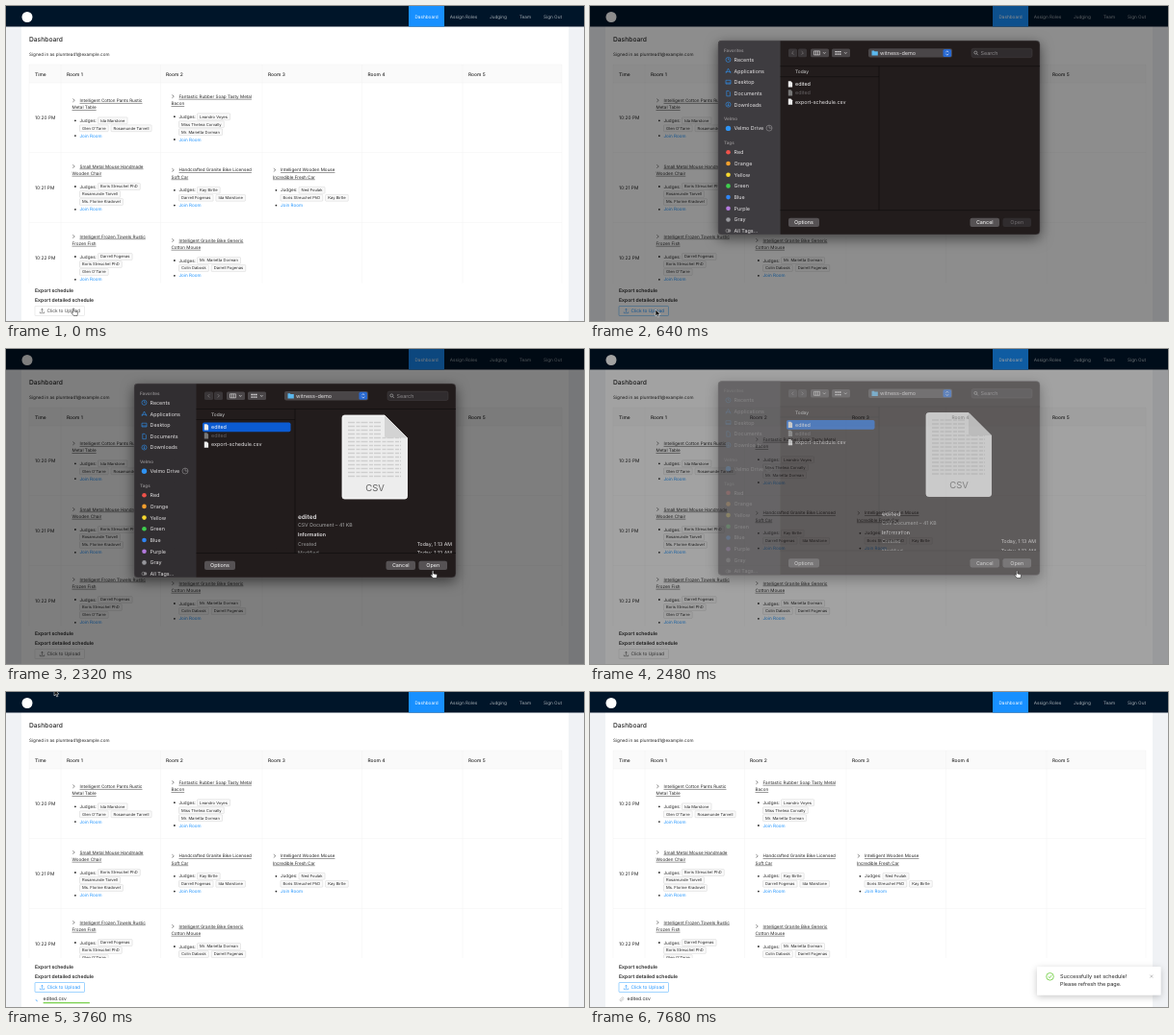
An HTML page that plays this animation: 600x328 px, repeating every 8 s.

```html
<!DOCTYPE html>
<html>
<head>
<meta charset="utf-8">
<style>
  html, body { margin: 0; width: 100%; height: 100%; overflow: hidden; background: #f0f2f5; }
  svg { display: block; font-family: Inter, Roboto, sans-serif; text-rendering: geometricPrecision; --btn: #444; --edge: #d9d9d9; }
  .btn { fill: #fff; stroke: var(--edge); stroke-width: .5; }
  .ink { stroke: var(--btn); fill: none; stroke-width: .5; }
</style>
</head>
<body>
<svg id="stage" width="600" height="328" viewBox="0 0 600 328"></svg>
<script>
const stage = document.getElementById('stage');
const $ = id => document.getElementById(id);
const INK = '#262626', LINK = '#1890ff', BODY = 4.6;

// y is the vertical middle of the text
const text = (x, y, s, size = BODY, fill = INK, attrs = '') =>
  `<text x="${x}" y="${y + size * .36}" font-size="${size}" fill="${fill}" ${attrs}>${s}</text>`;
const rect = (x, y, w, h, fill, attrs = '') =>
  `<rect x="${x}" y="${y}" width="${w}" height="${h}" fill="${fill}" ${attrs}/>`;
const dot = (x, y, r, fill, attrs = '') => `<circle cx="${x}" cy="${y}" r="${r}" fill="${fill}" ${attrs}/>`;
const path = (d, attrs) => `<path d="${d}" ${attrs}/>`;
const line = (d, color, width = .5, attrs = '') => path(d, `fill="none" stroke="${color}" stroke-width="${width}" ${attrs}`);
const BOLD = 'font-weight="600"', MEDIUM = 'font-weight="500"', MIDDLE = 'text-anchor="middle"';

const ruler = document.createElement('canvas').getContext('2d');
ruler.font = '100px Inter, Roboto, sans-serif';
const widthOf = (s, size) => ruler.measureText(s).width * size / 100;

function tagRow(x, y, names) {
  return names.map(name => {
    const w = widthOf(name, 4.1) + 5.2;
    const tag = rect(x, y - 3.4, w, 6.8, '#fafafa', 'rx=".7" stroke="#cfcfcf" stroke-width=".45"') +
      text(x + 2.6, y, name, 4.1);
    x += w + 2.8;
    return tag;
  }).join('');
}

function cell(x, y, title, rows) {
  const under = 'text-decoration="underline"';
  const joinY = y + 20.8 + rows.length * 8;
  return line(`M${x + .8} ${y - 1.7}l2 1.7l-2 1.7`, INK) +
    text(x + 8, y, title[0], BODY, INK, under) + text(x, y + 7.2, title[1], BODY, INK, under) +
    dot(x + 3.4, y + 21, .9, INK) + text(x + 8, y + 21, 'Judges:') +
    rows.map((names, i) => tagRow(x + (i ? 8 : 27), y + 21 + i * 8, names)).join('') +
    dot(x + 3.4, joinY, .9, INK) + text(x + 8, joinY, 'Join Room', BODY, LINK);
}

const KIM = 'Ida Marstone', OWEN = "Glen O'Tarre", JACQ = 'Rosamunde Tarvell', SAM = 'Mr. Marietta Dorman',
  CHRIS = 'Boris Streuchel PhD', JAY = 'Kay Birtle', CARROLL = 'Darrell Fogenas';

const columns = [57, 160.5, 266, 369.5, 474];
const table =
  rect(24, 61, 553, 19, '#fafafa') +
  line('M24 61H577M24 80H577M24 152.5H577M24 225.5H577M24 61V300M577 61V300' +
    columns.map(x => `M${x} 61V300`).join(''), '#f2f2f2') +
  text(30, 71, 'Time', 4.9, INK, MEDIUM) +
  [63, 166, 272, 375.5, 480].map((x, i) => text(x, 71, `Room ${i + 1}`, 4.9, INK, MEDIUM)).join('') +
  [116, 188.8, 261.8].map((y, i) => text(30, y, `10:2${i} PM`, 4.9)).join('') +
  cell(68.5, 98.3, ['Intelligent Cotton Pants Rustic', 'Metal Table'], [[KIM], [OWEN, JACQ]]) +
  cell(171.5, 94.2, ['Fantastic Rubber Soap Tasty Metal', 'Bacon'], [['Leandro Voyes'], ['Miss Thelma Corvally'], [SAM]]) +
  cell(68.5, 167, ['Small Metal Mouse Handmade', 'Wooden Chair'], [[CHRIS], [JACQ], ['Ms. Florine Kradovel']]) +
  cell(171.5, 170.8, ['Handcrafted Granite Bike Licensed', 'Soft Car'], [[JAY], [CARROLL, KIM]]) +
  cell(277, 170.8, ['Intelligent Wooden Mouse', 'Incredible Fresh Car'], [['Ned Foulak'], [CHRIS, JAY]]) +
  cell(68.5, 240, ['Intelligent Frozen Towels Rustic', 'Frozen Fish'], [[CARROLL], [CHRIS], [OWEN]]) +
  cell(171.5, 244, ['Intelligent Granite Bike Generic', 'Cotton Mouse'], [[SAM], ['Colin Dabosk', CARROLL]]);

const menu = [[475, 'Assign Roles'], [511, 'Judging'], [539, 'Team'], [567.5, 'Sign Out']];
const page =
  rect(0, 0, 600, 328, '#f0f2f5') + rect(16, 21, 568, 307, '#fff') + rect(0, 0, 600, 21.5, '#001529') +
  dot(22, 11.5, 5.5, '#fff') + rect(418, 0, 37, 21.5, LINK) +
  text(436.5, 11, 'Dashboard', 4.7, '#fff', MIDDLE) +
  menu.map(([x, s]) => text(x, 11, s, 4.7, '#a6adb4', MIDDLE)).join('') +
  text(24, 34.7, 'Dashboard', 6.7, INK, MEDIUM) + text(24, 50, 'Signed in as plumtea41@example.com') +
  `<clipPath id="view"><rect id="viewRect" x="16" y="55" width="568"/></clipPath><g clip-path="url(#view)">${table}</g>` +
  `<g id="foot">${text(30, 296.5, 'Export schedule', 5.1, INK, BOLD)}
    ${text(30, 306, 'Export detailed schedule', 5.1, INK, BOLD)}
    <rect class="btn" x="30" y="312.5" width="51.5" height="10" rx=".7"/>
    <path class="ink" d="M37.5 319V315.2M36.2 316.5L37.5 315.2L38.8 316.5M35.3 318.3V319.8H39.7V318.3"/>
    ${text(42.5, 317.5, 'Click to Upload', 4.8, 'var(--btn)')}</g>` +
  `<g id="upload">${text(38.5, 319.7, 'edited.csv', 4.95)}
    <g id="spin">${line('M-2 0A2 2 0 0 0 0 2', LINK)}</g>
    <g id="clip">${line('M32 321.3l2.4-2.4a.7 .7 0 0 0-1-1l-2 2a1.2 1.2 0 0 0 1.7 1.7l2-2', '#888', .4)}</g>
    <rect id="bar" x="38.5" y="323.3" height="1" rx=".5"/></g>` +
  `<g id="notice">${rect(464, 286, 128.5, 29.5, '#fff', 'rx="1" filter="url(#soft)"')}
    ${dot(477.5, 296.3, 3.8, 'none', 'stroke="#52c41a" stroke-width=".7"')}
    ${line('M475.8 296.3l1.3 1.4l2.3-2.9', '#52c41a', .7)}
    ${text(488, 296.3, 'Successfully set schedule!', 5.5)}${text(488, 304.5, 'Please refresh the page.', 5.5)}
    ${line('M581.3 294.6l3 3m0-3l-3 3', '#888')}</g>`;

const PALE = '#e6e4e5', GREY = '#8f8c8e';
const places = [[53.3, 'Recents'], [65.1, 'Applications'], [76.7, 'Desktop'], [88.4, 'Documents'], [100, 'Downloads'], [124.8, 'Velmo Drive']];
const tags = [['Red', '#f0524a'], ['Orange', '#f5a02d'], ['Yellow', '#f8d92f'], ['Green', '#3fcf4e'],
  ['Blue', '#2f86f6'], ['Purple', '#b57be0'], ['Gray', '#98989d']];
const glyphs = 'M146 53.3a2.5 2.5 0 1 0-5 0a2.5 2.5 0 1 0 5 0M143.5 51.7V53.3H144.7' +
  'M141 67.5l2.5-5l2.5 5M140.7 65.8h5.6M141 74.7h5v3.8h-5zM141 77.5h5' +
  'M141.8 85.8h2.2l1.4 1.4v4h-3.6zM146 100a2.5 2.5 0 1 0-5 0a2.5 2.5 0 1 0 5 0M143.5 98.5v2.8l-1-1m1 1l1-1';
const sidePanel = 'M197.5 33.5H137a4 4 0 0 0-4 4V231.5a4 4 0 0 0 4 4H197.5z';

const pill = (x, w, s, fill, color, attrs = '') =>
  `<g ${attrs}>${rect(x, 218.2, w, 9.3, fill, 'rx="2"')}${text(x + w / 2, 222.9, s, 5.4, color, MIDDLE)}</g>`;
const file = (y, s, color, paper) =>
  path(`M205.8 ${y - 3}h2.7l1.6 1.6v4.6h-4.3z`, `fill="${paper}"`) + text(213, y, s, 5.4, color);

const sidebar =
  text(139, 43.5, 'Favorites', 4.6, GREY, BOLD) + text(139, 115, 'Velmo', 4.6, GREY, BOLD) +
  text(139, 140, 'Tags', 4.6, GREY, BOLD) +
  line(glyphs, '#2f94f5', .6) + dot(143.5, 124.8, 2.7, '#2f94f5') +
  dot(186, 124.5, 3, 'none', 'stroke="#a5a3a5" stroke-width=".5"') + line('M186 121.5V124.5H189', '#a5a3a5') +
  places.map(([y, s]) => text(149.5, y, s, 5.4, PALE)).join('') +
  tags.map(([s, c], i) => dot(143.5, 149.7 + i * 11.7, 2.3, c) + text(149.5, 149.7 + i * 11.7, s, 5.4, PALE)).join('') +
  dot(142.7, 231.4, 1.7, 'none', 'stroke="#aaa" stroke-width=".5"') + dot(144.6, 231.4, 1.7, '#8a888a') +
  text(149.5, 231.4, 'All Tags...', 5.4, PALE);

const toolbar =
  rect(206, 42, 9, 8.6, '#3a3638', 'rx="1.5"') + rect(216, 42, 9, 8.6, '#3a3638', 'rx="1.5"') +
  line('M211.3 44.6l-1.7 1.7l1.7 1.7M219.7 44.6l1.7 1.7l-1.7 1.7', GREY, .6) +
  rect(229, 42, 19, 8.6, '#4a4648', 'rx="1.5"') + rect(251, 42, 19, 8.6, '#4a4648', 'rx="1.5"') +
  line('M232.5 44.3h6v4h-6zM234.5 44.3v4M236.5 44.3v4M242 45.5l1.3 1.5l1.3-1.5M264 45.5l1.3 1.5l1.3-1.5', PALE, .6) +
  line('M254.5 45h6M254.5 47.6h6', PALE, 1.3, 'stroke-dasharray="1.6 .6"') +
  rect(289, 41.6, 87, 9.4, '#4a4648', 'rx="2"') + rect(366.5, 42.3, 8.5, 8, '#2869d2', 'rx="1.5"') +
  line('M369.4 45.6l1.4-1.5l1.4 1.5M369.4 47.1l1.4 1.5l1.4-1.5', '#fff', .6) +
  path('M292.5 43.8h2.3l.7 .8h3.3v4.4h-6.3z', 'fill="#5bb8ee"') + text(301, 46.3, 'witness-demo', 5.5, PALE) +
  rect(396, 41.6, 63, 9.4, '#302c2e', 'rx="2" stroke="#4c484a" stroke-width=".4"') +
  dot(400.3, 45.9, 1.5, 'none', 'stroke="#bbb" stroke-width=".6"') + line('M401.4 47l1.5 1.5', '#bbb', .6) +
  text(405.5, 46.3, 'Search', 5.4, GREY);

const paperLines = Array.from({ length: 15 }, (_, i) =>
  line(`M355 ${74 + i * 4}H${i < 4 ? 389 : 410}`, '#cfcfcf', 1.4, 'stroke-dasharray="7 1.5 4 1"')).join('');
const preview =
  path('M351.5 66.5H393l23.5 23.5V151a2.5 2.5 0 0 1-2.5 2.5H351.5a2.5 2.5 0 0 1-2.5-2.5V69a2.5 2.5 0 0 1 2.5-2.5z',
    'fill="#eee" stroke="#fff" stroke-width=".8"') +
  path('M393 66.5V87.5a2.5 2.5 0 0 0 2.5 2.5H416.500z', 'fill="#d4d4d4"') + paperLines +
  text(383, 142, 'CSV', 9.5, '#666', MIDDLE) +
  text(303, 172, 'edited', 6.4, PALE, BOLD) + text(303, 181, 'CSV Document – 41 KB', 5.2, '#aaa') +
  text(303, 191, 'Information', 5.2, PALE, BOLD) +
  ['Created', 'Modified'].map((s, i) => text(303, 200.3 + i * 9.5, s, 5.2, '#999') +
    text(463, 200.3 + i * 9.5, 'Today, 1:13 AM', 5.2, PALE, 'text-anchor="end"')).join('');

const dialog =
  rect(133, 33.5, 334, 202, '#211d1f', 'rx="4" filter="url(#deep)"') +
  path(sidePanel, 'fill="#312e31"') + path(sidePanel, 'id="sheen" fill="#47454a"') +
  rect(133, 33.5, 334, 202, 'none', 'rx="4" stroke="#5a5759" stroke-width=".5"') +
  `<g id="sidebar">${sidebar}</g>` +
  line('M197.5 60H467M197.5 71H300M300 60V210M197.5 210H467', '#0e0c0d', .6) + toolbar +
  text(213, 65.9, 'Today', 4.8, '#bbb', MEDIUM) +
  `<g class="picked">${rect(204, 73.9, 91.5, 9.8, '#0b5bd3', 'rx="1.8"')}</g>` +
  file(78.7, 'edited', '#fff', '#eee') + file(87.7, 'edited', '#666264', '#777') + file(97, 'export-schedule.csv', PALE, '#eee') +
  `<g class="picked"><clipPath id="info"><rect x="300" y="60" width="167" height="150"/></clipPath>
    <g clip-path="url(#info)">${preview}</g></g>` +
  pill(206, 32, 'Options', '#565254', '#fff') + pill(394.5, 30.5, 'Cancel', '#565254', '#fff') +
  pill(428.5, 29.5, 'Open', '#302c2e', '#6f6b6d') + pill(428.5, 29.5, 'Open', '#565254', '#fff', 'class="picked"');

const shadow = (id, dy, blur, opacity) =>
  `<filter id="${id}" x="-20%" y="-50%" width="140%" height="200%">
    <feDropShadow dx="0" dy="${dy}" stdDeviation="${blur}" flood-opacity="${opacity}"/></filter>`;

stage.innerHTML = shadow('soft', 2, 3.5, .22) + shadow('deep', 4, 7, .55) + page +
  `<rect id="dim" width="600" height="328"/><g id="dialog">${dialog}</g>
  <g id="cursor" stroke="#fff" stroke-width=".5" fill="#111" stroke-linejoin="round">
    <path id="arrow" d="M0 0V7L1.6 5.5L2.7 8L3.9 7.5L2.8 5.1H5z"/>
    <path id="hand" stroke="#111" fill="#fff" d="M-.6 .5a.7 .7 0 0 1 1.4 0V3l3 .6q.8 .2 .7 1L4 7.5H.3L-2 4.7q-.4-1 .6-.8l.8 .6z"/>
  </g>`;

const clamp = v => Math.min(1, Math.max(0, v));
const ramp = (t, a, b) => clamp((t - a) / (b - a));
const ease = p => p * p * (3 - 2 * p);

// time, x, y of the pointer tip
const route = [[0, 70, 315], [240, 68, 316], [640, 68, 316], [1300, 234, 85], [1900, 234, 85], [2320, 443, 231],
  [2640, 443, 231], [3600, 50, -3], [3900, 50, -3], [4300, 46, -12], [5040, 38, -12], [5440, 42, 24.5], [8000, 42, 24.5]];

function pointer(t) {
  const i = route.findIndex(k => k[0] > t);
  const [t0, x0, y0] = route[i - 1], [t1, x1, y1] = route[i];
  const p = ease(ramp(t, t0, t1));
  return [x0 + (x1 - x0) * p, y0 + (y1 - y0) * p];
}

const show = (el, on) => el.setAttribute('opacity', +on);
const move = (id, x, y) => $(id).setAttribute('transform', `translate(${x} ${y})`);

function draw(t) {
  const uploaded = t >= 3040, done = t >= 4800;
  const focused = (t > 80 && t < 900) || t > 2800;
  stage.style.setProperty('--btn', focused ? LINK : '#444');
  stage.style.setProperty('--edge', focused ? '#40a9ff' : '#d9d9d9');
  $('viewRect').setAttribute('height', uploaded ? 222 : 233.5);
  move('foot', 0, uploaded ? -10 : 0);

  show($('upload'), uploaded);
  show($('spin'), !done);
  $('spin').setAttribute('transform', `translate(33 320) rotate(${t * .3 - 1128})`);
  show($('clip'), done);
  const load = ramp(t, 3100, 3500);
  $('bar').setAttribute('width', 48.5 * load);
  $('bar').setAttribute('fill', load < 1 ? LINK : '#52c41a');
  show($('bar'), 1 - ramp(t, 4800, 4960));

  const slide = ease(ramp(t, 4800, 5080));
  move('notice', 136 * (1 - slide), 0);
  show($('notice'), slide);

  const settle = ease(ramp(t, 480, 850));
  show($('dim'), .61 * ramp(t, 60, 850) * (1 - ramp(t, 2200, 2900)));
  show($('dialog'), ramp(t, 160, 360) * (1 - ramp(t, 2320, 2660)));
  show($('sheen'), 1 - settle);
  show($('sidebar'), 1 - ramp(t, 2320, 2560));
  move('dialog', 0, 6.5 * settle * (1 - ease(ramp(t, 2160, 2440))));
  document.querySelectorAll('.picked').forEach(el => show(el, t >= 1840));

  const hand = t < 240 || (t > 2320 && t < 2800);
  move('cursor', ...pointer(t));
  show($('cursor'), t < 6600);
  show($('hand'), hand);
  show($('arrow'), !hand);
}

const start = performance.now();
function tick() {
  draw((performance.now() - start) % 8000);
  requestAnimationFrame(tick);
}
tick();
</script>
</body>
</html>
```
